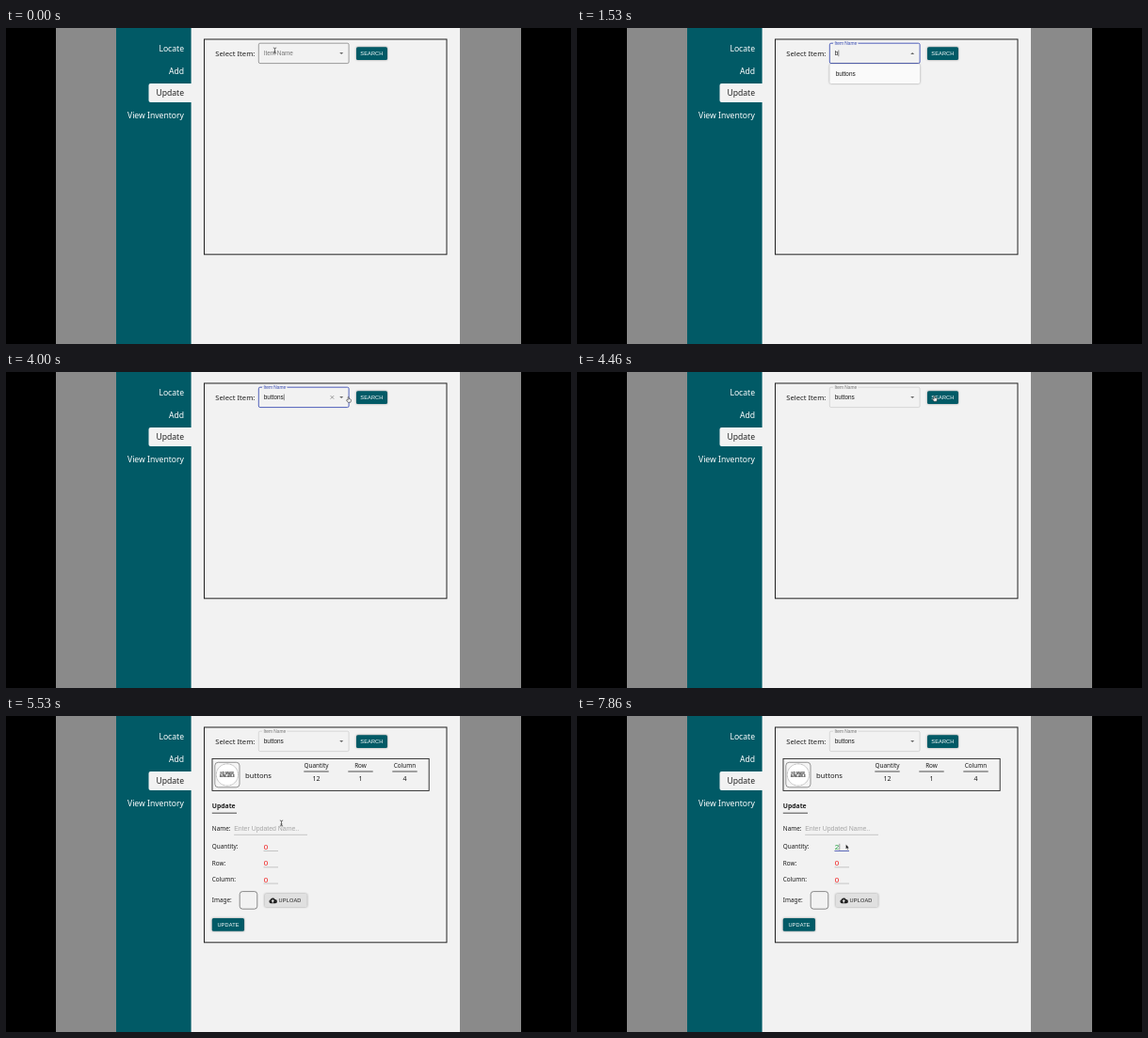
These frames come from a looping animation (600 by 336 pixels, 8000 ms). An HTML page:

```html
<!DOCTYPE html>
<html lang="en">
<head>
<meta charset="utf-8">
<title>Inventory update</title>
<style>
html, body { margin: 0; width: 100%; height: 100%; overflow: hidden; background: #000; }
svg { display: block; width: 100%; height: 100%; }
text { font-family: "Noto Sans", "Open Sans", sans-serif; font-size: 6.4px; fill: #1c1c1c; white-space: pre; }
.nav text { font-size: 8.6px; fill: #fff; text-anchor: end; }
.ui { font-family: "Liberation Sans", Arial, sans-serif; }
.btn { font-size: 5.6px; letter-spacing: .16px; text-anchor: middle; }
.mid { text-anchor: middle; }
.num { font-size: 8px; fill: #f01818; }
.line { stroke: #222; stroke-width: .8; fill: none; }
.thin { stroke: #949494; stroke-width: .5; fill: none; }
.shade { filter: drop-shadow(0 .8px .8px rgba(0,0,0,.4)); }
</style>
</head>
<body>
<svg viewBox="0 0 600 336" xmlns="http://www.w3.org/2000/svg">
  <defs><clipPath id="searchClip"><rect x="372" y="20.3" width="33" height="13.7" rx="1.6"/></clipPath></defs>
  <rect width="600" height="336"/>
  <rect x="53" width="494" height="336" fill="#8a8a8a"/>
  <rect x="117" width="365" height="336" fill="#f2f2f2"/>
  <rect x="117" width="79.6" height="336" fill="#015a66"/>
  <path d="M197 59H153.500Q151.500 59 151.500 61V77Q151.500 79 153.500 79H197Z" fill="#f2f2f2"/>
  <g class="nav">
    <text x="189" y="24.700">Locate</text>
    <text x="189" y="48.500">Add</text>
    <text x="189" y="72.300" style="fill:#222">Update</text>
    <text x="189" y="96.200">View Inventory</text>
  </g>
  <rect class="line" x="210.500" y="12" width="257.500" height="228.800" style="stroke-width:1"/>
  <text x="222.300" y="29.800" style="font-size:7.65px">Select Item:</text>

  <g id="results">
    <rect class="line" x="219" y="45.400" width="230.200" height="34" style="stroke-width:.9"/>
    <rect x="221.800" y="49.300" width="26.200" height="26.500" rx="3.500" fill="#f5f5f5" stroke="#555" stroke-width=".6"/>
    <circle cx="234.900" cy="62.500" r="11.600" fill="#fff" stroke="#8c8c8c" stroke-width=".7" stroke-dasharray=".9 .5"/>
    <g class="mid" style="font-weight:600">
      <text class="ui mid" x="234.900" y="61.800" style="font-size:2.9px">NO IMAGE</text>
      <text class="ui mid" x="234.900" y="65.400" style="font-size:2.9px">AVAILABLE</text>
    </g>
    <text x="254" y="65.500" style="font-size:7.65px">buttons</text>
    <g id="stats"></g>
    <text x="218.800" y="98.400" style="font-size:6.8px;font-weight:700">Update</text>
    <path class="line" d="M218.800 103.200H245"/>
    <text x="218.800" y="121.800">Name:</text>
    <text class="ui" x="242.200" y="122.200" style="font-size:6.95px;fill:#a6a6a6">Enter Updated Name..</text>
    <path class="thin" d="M242.200 126.300H320"/>
    <g id="fields"></g>
    <path id="qtyLine" d="M273.500 143.500H289" fill="none"/>
    <path id="spin" d="M285.300 138.400l1.200-1.500 1.200 1.500zM285.300 139.700l1.200 1.500 1.200-1.500z" fill="#999"/>
    <path id="qtyCaret" d="M278.800 135.800V142.600" stroke="#333" stroke-width=".45"/>
    <text x="218.800" y="198.400">Image:</text>
    <rect x="248.200" y="186.600" width="18.600" height="18.600" rx="3" fill="none" stroke="#444" stroke-width=".6"/>
    <rect class="shade" x="274.700" y="189" width="45" height="14" rx="1.600" fill="#e0e0e0"/>
    <path d="M281.300 199.200A2 2 0 0 1 280.800 195.300A2.700 2.700 0 0 1 285.700 194.900A2.150 2.150 0 0 1 285.900 199.200Z" fill="#222"/>
    <path d="M283.300 194.900l1.800 1.900h-1.100v1.600h-1.400v-1.600h-1.100z" fill="#e0e0e0"/>
    <text class="ui btn" x="301.600" y="198.100">UPLOAD</text>
    <rect class="shade" x="218.800" y="215.100" width="34.200" height="13.700" rx="1.600" fill="#015a66"/>
    <text class="ui btn" x="236" y="224.100" style="fill:#fff">UPDATE</text>
  </g>

  <rect id="outline" x="268.300" y="16.200" width="95.800" height="21.400" rx="1.600" fill="none"/>
  <rect id="notch" x="272" y="15.400" height="1.700" fill="#f2f2f2"/>
  <text id="label" class="ui">Item Name</text>
  <text id="value" class="ui" x="273.800" y="29.200"></text>
  <path id="caret" stroke="#222" stroke-width=".5"/>
  <path id="clear" d="M344.600 25.100l3.600 3.600m0-3.600l-3.600 3.600" stroke="#666" stroke-width=".6"/>
  <path id="arrow" d="M-2-1H2L0 1Z" fill="#666"/>
  <rect class="shade" x="372" y="20.300" width="33" height="13.700" rx="1.600" fill="#015a66"/>
  <circle id="ripple" cx="380" cy="28" fill="#fff" clip-path="url(#searchClip)"/>
  <text class="ui btn" x="388.400" y="29.200" style="fill:#fff">SEARCH</text>

  <g id="popup">
    <rect id="paper" class="shade" x="268.300" y="38.300" width="95.800" rx="1.600" fill="#fafafa"/>
    <rect id="hover" x="268.300" y="41.500" width="95.800" height="14.400" fill="#ededed"/>
    <g id="options"></g>
  </g>

  <g id="pointer">
    <g id="beam" fill="none" stroke-linecap="round">
      <path d="M-1.300-3Q0-3 0-2V2Q0 3-1.300 3M1.300-3Q0-3 0-2M0 2Q0 3 1.300 3M-.7 1H.7" stroke="#333" stroke-width=".65"/>
    </g>
    <path id="hand" d="M-.9-2.800Q-.3-3.400.1-2.700V-.9L1.900-.5Q2.600-.2 2.500.6L2 2.700H-.9L-2.300.9Q-2.600 0-1.800.1L-.9.7Z" fill="#fff" stroke="#222" stroke-width=".55" stroke-linejoin="round"/>
    <path id="tip" d="M-1.500-3V2L-.3 1L.5 2.800L1.300 2.400L.5.700H2Z" fill="#111" stroke="#fff" stroke-width=".35"/>
  </g>
</svg>
<script>
const LOOP = 8000, STEP = 200 / 3;
const $ = id => document.getElementById(id);
const set = (id, attrs) => { for (const k in attrs) $(id).setAttribute(k, attrs[k]); };
const show = (id, on) => { $(id).style.display = on ? "" : "none"; };
const clamp = v => Math.max(0, Math.min(1, v));
const ease = v => { v = clamp(v); return v * v * (3 - 2 * v); };
const mix = (a, b, k) => a + (b - a) * k;

$("stats").innerHTML = [["Quantity", 12, 329.5], ["Row", 1, 376.5], ["Column", 4, 423.5]].map(([name, n, x]) =>
  `<text class="mid" x="${x}" y="54.500">${name}</text>
   <path class="line" d="M${x - 13.2} 59H${x + 13.2}"/>
   <text class="mid" x="${x}" y="68.800" style="font-size:7px">${n}</text>`).join("");

$("fields").innerHTML = [["Quantity", 141.4], ["Row", 158.7], ["Column", 176]].map(([name, y]) =>
  `<text x="218.800" y="${y}">${name}:</text>
   <text class="ui num" id="n${name}" x="273.700" y="${y + .5}">0</text>
   <path class="thin" d="M273.500 ${y + 2.1}H289"/>`).join("");

$("options").innerHTML = ["buttons", "needles", "pins", "scissors", "thread", "zippers"].map((name, i) =>
  `<text class="ui" x="274.700" y="${51.1 + i * 14.4}">${name}</text>`).join("");

const FOCUS = 266, TYPED = 1400, PICKED = 3660, PRESS = 4460, LOADED = 4590, ONE = 7190, TWO = 7580;

// time, x, y, pointer shape from that time on
const path = [
  [0, 285.5, 24, "beam"], [590, 285.5, 24, "beam"], [740, 345, 25.5, "beam"], [860, 370.5, 26, "tip"],
  [1390, 370.5, 26, ""], [2700, 370.5, 26, "tip"], [2900, 384, 58, "tip"], [3130, 330, 88, "tip"],
  [3400, 304, 51, "hand"], [3700, 304, 51, "hand"], [4000, 364, 29.5, "hand"], [4260, 380, 28.5, "hand"],
  [5130, 380, 28.5, "hand"], [5280, 354, 50, "tip"], [5533, 292.5, 114, "beam"], [6130, 284, 129, "beam"],
  [6500, 279.3, 137, "beam"], [6800, 279.3, 137, "beam"], [7060, 287, 139.5, "tip"], [LOOP, 287, 139.5, "tip"]
];

// each entry restarts the caret's blink
const blinks = [[FOCUS, 273.9], [TYPED, 277.8], [PICKED, 295.3]];

function drawPointer(t) {
  let i = 0;
  while (i < path.length - 2 && path[i + 1][0] <= t) i++;
  const [t0, x0, y0, kind] = path[i], [t1, x1, y1] = path[i + 1];
  const k = ease((t - t0) / (t1 - t0));
  set("pointer", { transform: `translate(${mix(x0, x1, k)} ${mix(y0, y1, k)})` });
  for (const id of ["beam", "hand", "tip"]) show(id, id === kind);
}

function drawField(t) {
  const focus = t >= FOCUS && t < PRESS, open = t >= FOCUS && t < PICKED;
  const up = ease((t - FOCUS + 30) / 200);
  set("outline", {
    stroke: focus ? "#3f51b5" : t < FOCUS ? "#444" : "#bbb",
    "stroke-width": focus ? .9 : .5
  });
  set("notch", { width: 26.5 * up });
  set("label", {
    transform: `translate(273.600 ${mix(29.1, 17.8, up)}) scale(${mix(1, .75, up)})`,
    style: `fill:${focus ? "#3f51b5" : "#777"}`
  });
  $("value").textContent = t < TYPED ? "" : t < PICKED ? "b" : "buttons";
  set("arrow", { transform: `translate(356.200 27)${open ? " scale(1 -1)" : ""}` });
  show("clear", t >= PICKED && focus);

  const blink = blinks.filter(b => b[0] <= t).pop();
  show("caret", focus && blink && (t - blink[0]) % 1000 < 500);
  if (blink) set("caret", { d: `M${blink[1]} 23.500V30.200` });

  show("popup", open);
  const all = t < TYPED;
  set("paper", { height: all ? 90.4 : 20.6 });
  [...$("options").children].forEach((o, i) => { o.style.display = all || i === 0 ? "" : "none"; });
  show("hover", t >= 3330);
}

function drawForm(t) {
  show("results", t >= LOADED);
  const press = t - PRESS;
  set("ripple", {
    r: press < 0 ? 0 : 29 * ease(press / 420),
    opacity: press < 0 ? 0 : .27 * (1 - clamp((press - 260) / 450))
  });
  const over = t >= 6130, focus = t >= ONE;
  const qty = t < ONE ? 0 : t < TWO ? 1 : 2;
  $("nQuantity").textContent = qty;
  $("nQuantity").style.fill = qty ? "#1f9d3f" : "";
  set("qtyLine", {
    stroke: focus ? "#3f51b5" : over ? "#222" : "none",
    "stroke-width": .8
  });
  show("spin", over);
  show("qtyCaret", focus && (t - (t < TWO ? ONE : TWO)) % 1000 < 500);
}

function draw(ms) {
  const t = Math.floor((ms % LOOP + 10) / STEP) * STEP;
  drawField(t);
  drawForm(t);
  drawPointer(t);
}

const start = performance.now();
function tick() {
  draw(performance.now() - start);
  requestAnimationFrame(tick);
}
tick();
</script>
</body>
</html>
```
